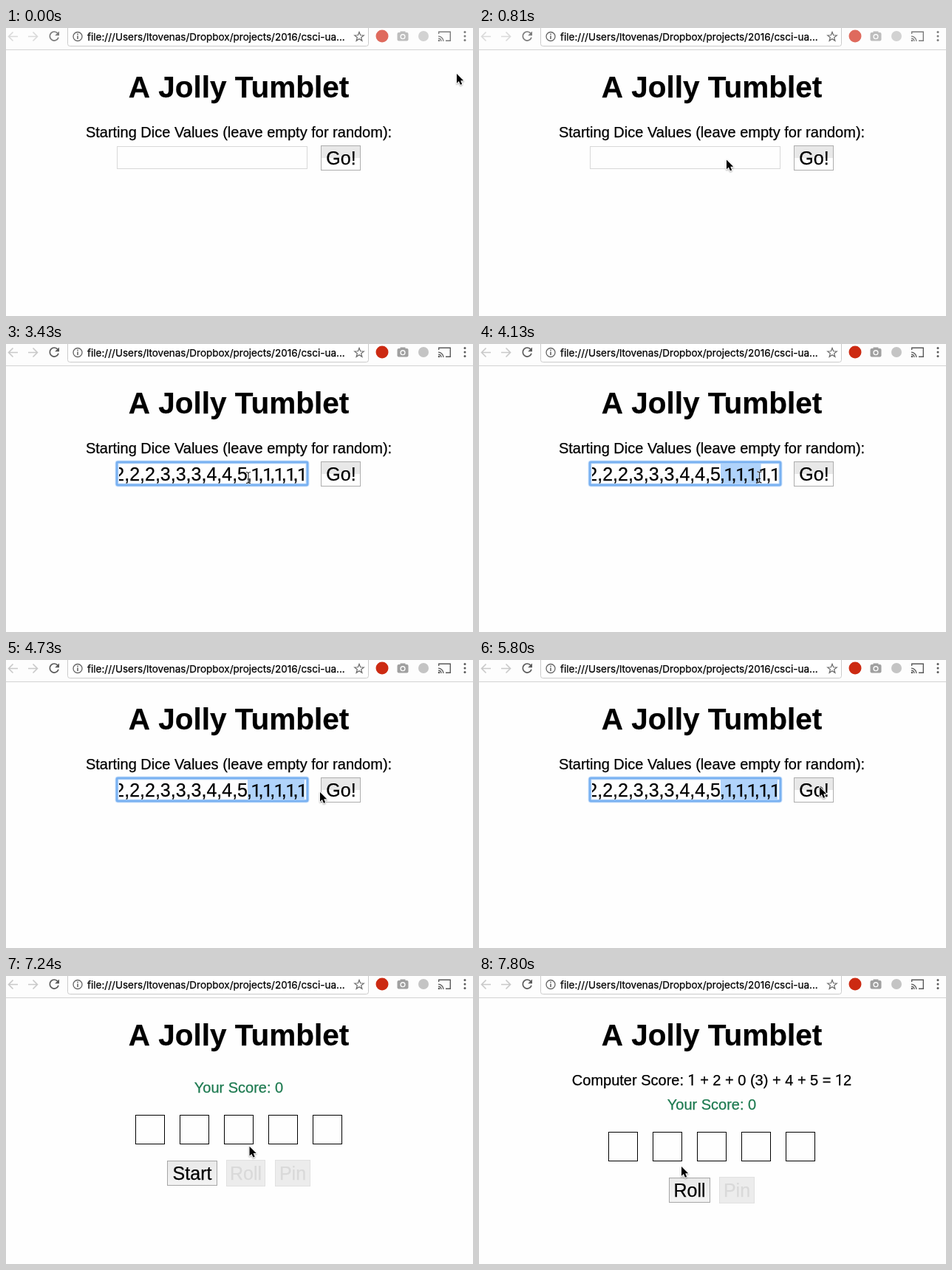
Animation, 632 px wide and 390 px high, one loop 8 s. Source, as an HTML page with a canvas:

```html
<!DOCTYPE html>
<html lang="en">
<head>
<meta charset="utf-8">
<title>Dice game</title>
<style>
  html, body { margin: 0; width: 100%; height: 100%; overflow: hidden; background: #fefefe; }
  canvas { display: block; }
</style>
</head>
<body>
<canvas id="stage" width="632" height="390"></canvas>
<script>
const ctx = document.getElementById('stage').getContext('2d');
const LOOP = 8000;
const SANS = '"Liberation Sans", Arial, sans-serif';
const ONES = 'Roboto, sans-serif';

// Pointer path: time, x, y
const PATH = [
  [0, 610, 62], [30, 610, 62], [110, 592, 42], [180, 556, 38], [270, 470, 96],
  [360, 388, 170], [430, 366, 186], [700, 366, 186], [810, 335, 178.5],
  [1190, 335, 178.5], [1400, 269, 161], [2490, 269, 161], [2830, 331, 180],
  [3310, 331, 180], [3430, 328, 181], [3790, 328, 181], [4300, 405, 180],
  [4500, 426, 178], [4729, 426, 178], [4730, 425, 179], [5480, 425, 179],
  [5800, 461, 172], [6940, 461, 172], [7150, 372, 210], [7360, 274, 258], [LOOP, 274, 258]
];

const within = (t, a, b) => t >= a && t < b;

function pointerAt(t) {
  let i = 1;
  while (PATH[i][0] < t) i++;
  const [t0, x0, y0] = PATH[i - 1], [t1, x1, y1] = PATH[i];
  const k = (t - t0) / (t1 - t0);
  return [x0 + (x1 - x0) * k, y0 + (y1 - y0) * k];
}

function box(x, y, w, h, fill, line) {
  ctx.fillStyle = fill;
  ctx.fillRect(x, y, w, h);
  ctx.strokeStyle = line;
  ctx.lineWidth = 1;
  ctx.strokeRect(x + .5, y + .5, w - 1, h - 1);
}

function disc(x, y, r, fill) {
  ctx.fillStyle = fill;
  ctx.beginPath();
  ctx.arc(x, y, r, 0, 7);
  ctx.fill();
}

function stroke(d, color, width) {
  ctx.strokeStyle = color;
  ctx.lineWidth = width;
  ctx.stroke(new Path2D(d));
}

// A hairline stroke gives the slightly heavy look of smoothed screen text.
function ink(str, x, y, color) {
  ctx.fillStyle = ctx.strokeStyle = color;
  ctx.lineWidth = .25;
  ctx.fillText(str, x, y);
  ctx.strokeText(str, x, y);
}

// The digit 1 is set without a foot, so it comes from a second family.
function type(str, x, y, size, color = '#000', align = 'left') {
  const parts = str.split(/(1)/).filter(Boolean);
  const setFont = p => {
    ctx.font = p === '1' ? `${size * .98}px ${ONES}` : `${size}px ${SANS}`;
  };
  const widths = parts.map(p => { setFont(p); return ctx.measureText(p).width; });
  const total = widths.reduce((a, b) => a + b, 0);
  if (align === 'center') x -= total / 2;
  if (align === 'right') x -= total;
  parts.forEach((p, i) => {
    setFont(p);
    ink(p, x, y, color);
    x += widths[i];
  });
}

function toolbar(active) {
  const soft = active ? '#c9c9c9' : '#dadada';
  const dark = active ? '#5a5a5a' : '#7c7c7c';
  const mid = active ? '#a0a0a0' : '#bdbdbd';
  ctx.fillStyle = '#fdfdfd';
  ctx.fillRect(0, 0, 632, 29);
  ctx.fillStyle = '#d2d2d2';
  ctx.fillRect(0, 29, 632, 1);

  stroke('M16 11.5H4 M9.5 5.5L3.5 11.5L9.5 17.5', soft, 1.6);
  stroke('M30 11.5H42 M36.5 5.5L42.5 11.5L36.5 17.5', soft, 1.6);
  stroke('M70 7.3A6 6 0 1 0 71 12.8', dark, 1.7);
  ctx.fillStyle = dark;
  ctx.fill(new Path2D('M72 4.5V10.3H66.2Z'));

  ctx.fillStyle = '#fff';
  ctx.strokeStyle = '#cbcbcb';
  ctx.lineWidth = 1;
  ctx.beginPath();
  ctx.roundRect(83.5, -8.5, 407, 33, 3);
  ctx.fill();
  ctx.stroke();

  stroke('M103 11.5A6 6 0 1 0 91 11.5A6 6 0 1 0 103 11.5', '#666', 1.3);
  ctx.fillStyle = '#666';
  ctx.fillRect(96.2, 10.5, 1.6, 4.5);
  ctx.fillRect(96.2, 7.6, 1.6, 1.7);
  ctx.font = '13.5px Inter, sans-serif';
  ink('file:///Users/ltovenas/Dropbox/projects/2016/csci-ua...', 110, 16.5, '#000');

  ctx.beginPath();
  for (let i = 0; i < 10; i++) {
    const a = -Math.PI / 2 + i * Math.PI / 5, r = i % 2 ? 2.8 : 6.6;
    ctx.lineTo(478 + r * Math.cos(a), 12 + r * Math.sin(a));
  }
  ctx.closePath();
  ctx.strokeStyle = '#666';
  ctx.lineWidth = 1.2;
  ctx.stroke();

  disc(509, 11, 8.5, active ? '#cc2a12' : '#df6a5d');

  ctx.fillStyle = mid;
  ctx.beginPath();
  ctx.roundRect(529.5, 6, 15, 11.5, 2);
  ctx.fill();
  ctx.fillRect(533.5, 4.5, 7, 3);
  disc(537, 11.7, 3.6, '#fdfdfd');
  disc(537, 11.7, 2.2, mid);

  disc(565, 11, 7, active ? '#c4c4c4' : '#d2d2d2');

  stroke('M585.7 8V5.2H601.3V17.3H595', dark, 1.4);
  stroke('M585 11.2A7 7 0 0 1 592 18 M585 14.2A4 4 0 0 1 589 18', dark, 1.3);
  disc(586, 17, 1.3, dark);
  for (const y of [5.5, 11, 16.5]) disc(621, y, 1.5, dark);
}

function button(label, x, y, w, h, off, pressed) {
  const fill = ctx.createLinearGradient(0, y, 0, y + h);
  fill.addColorStop(0, pressed ? '#dcdcdc' : '#e9e9e9');
  fill.addColorStop(1, pressed ? '#e6e6e6' : '#f3f3f3');
  box(x, y, w, h, off ? '#ececec' : fill, off ? '#e0e0e0' : '#a6a6a6');
  type(label, x + w / 2, y + (off ? 27 : 26), 25, off ? '#d9d9d9' : '#000', 'center');
}

function caret(x) {
  ctx.fillStyle = '#000';
  ctx.fillRect(x, 162, 1, 27);
}

function field(t, pointerX) {
  box(150, 160, 258, 31, '#fefefe', '#d8d8d8');
  if (t >= 1480) {
    for (const [width, color] of [[5, 'rgba(120,178,245,.35)'], [3, '#79b1f1']]) {
      ctx.strokeStyle = color;
      ctx.lineWidth = width;
      ctx.beginPath();
      ctx.roundRect(150, 160, 258, 31, 1.5);
      ctx.stroke();
    }
  }
  if (t >= 2160) {
    ctx.save();
    ctx.beginPath();
    ctx.rect(153, 161, 252, 29);
    ctx.clip();
    const step = 15.6;
    if (t >= 3790) {
      const end = Math.min(404, 327 + Math.round((pointerX - 327) / (step / 2)) * step / 2);
      ctx.fillStyle = '#b0d3fb';
      ctx.fillRect(327, 162, Math.max(0, end - 327), 28);
    }
    type('2,2,2,3,3,3,4,4,5', 327, 185, 25, '#000', 'right');
    for (let i = 0; i < 5; i++) {
      type(',', 326 + i * step, 185, 25);
      type('1', 331.6 + i * step, 185, 25);
    }
    ctx.restore();
  }
  if (within(t, 1480, 1990)) caret(153);
  if (within(t, 2160, 2660)) caret(403);
  if (within(t, 3310, 3430)) caret(327);
}

function setup(t, pointerX) {
  type('Starting Dice Values (leave empty for random):', 315, 148, 20, '#000', 'center');
  field(t, pointerX);
  const pressed = t >= 6130;
  box(426, 159, 54, 34, pressed ? '#e6e6e6' : '#fefefe', '#adadad');
  ctx.fillStyle = pressed ? '#dadada' : '#e8e8e8';
  ctx.fillRect(427, 160, 52, 16);
  type('Go!', 453.5, 185, 25, '#000', 'center');
}

function board(scoreY, diceY) {
  type('Your Score: 0', 315, scoreY, 20, '#1d7a50', 'center');
  for (let i = 0; i < 5; i++) box(175 + 60 * i, diceY, 40, 40, '#fefefe', '#000');
}

function game(t) {
  if (t < 7800) {
    board(158, 188);
    button('Start', 218, 250, 68, 34, false, t >= 7620);
    button('Roll', 298, 249, 53, 36, true);
    button('Pin', 364, 249, 48, 36, true);
  } else {
    type('Computer Score: 1 + 2 + 0 (3) + 4 + 5 = 12', 315, 148, 20, '#000', 'center');
    board(181, 211);
    button('Roll', 257, 273, 56, 34, false);
    button('Pin', 325, 272, 48, 36, true);
  }
}

function pointer(t, x, y) {
  ctx.save();
  ctx.translate(x, y);
  if (within(t, 910, 4500) && x < 409) {
    const beam = 'M-3 -7.5Q0 -7.5 0 -5.5Q0 -7.5 3 -7.5 M0 -6V6 M-3 7.5Q0 7.5 0 5.5Q0 7.5 3 7.5 M-1.5 2H1.5';
    stroke(beam, 'rgba(255,255,255,.7)', 2.4);
    stroke(beam, '#222', 1.1);
  } else {
    const arrow = new Path2D('M0 0V12.8L2.9 10.1L4.9 14.8L7.2 13.9L5.2 9.3H9.2Z');
    ctx.lineJoin = 'round';
    ctx.strokeStyle = '#fff';
    ctx.lineWidth = 1.8;
    ctx.shadowColor = 'rgba(0,0,0,.35)';
    ctx.shadowBlur = 2;
    ctx.shadowOffsetY = 1;
    ctx.stroke(arrow);
    ctx.shadowColor = 'transparent';
    ctx.fillStyle = '#000';
    ctx.fill(arrow);
  }
  ctx.restore();
}

function draw(t) {
  const [x, y] = pointerAt(t);
  ctx.fillStyle = '#fefefe';
  ctx.fillRect(0, 0, 632, 390);
  toolbar(t >= 910);
  ctx.font = `bold 40.5px ${SANS}`;
  ctx.textAlign = 'center';
  ink('A Jolly Tumblet', 315, 94, '#000');
  ctx.textAlign = 'left';
  if (t < 6220) setup(t, x);
  else game(t);
  pointer(t, x, y);
}

const start = performance.now();
function tick() {
  draw((performance.now() - start) % LOOP);
  requestAnimationFrame(tick);
}
tick();
</script>
</body>
</html>
```
